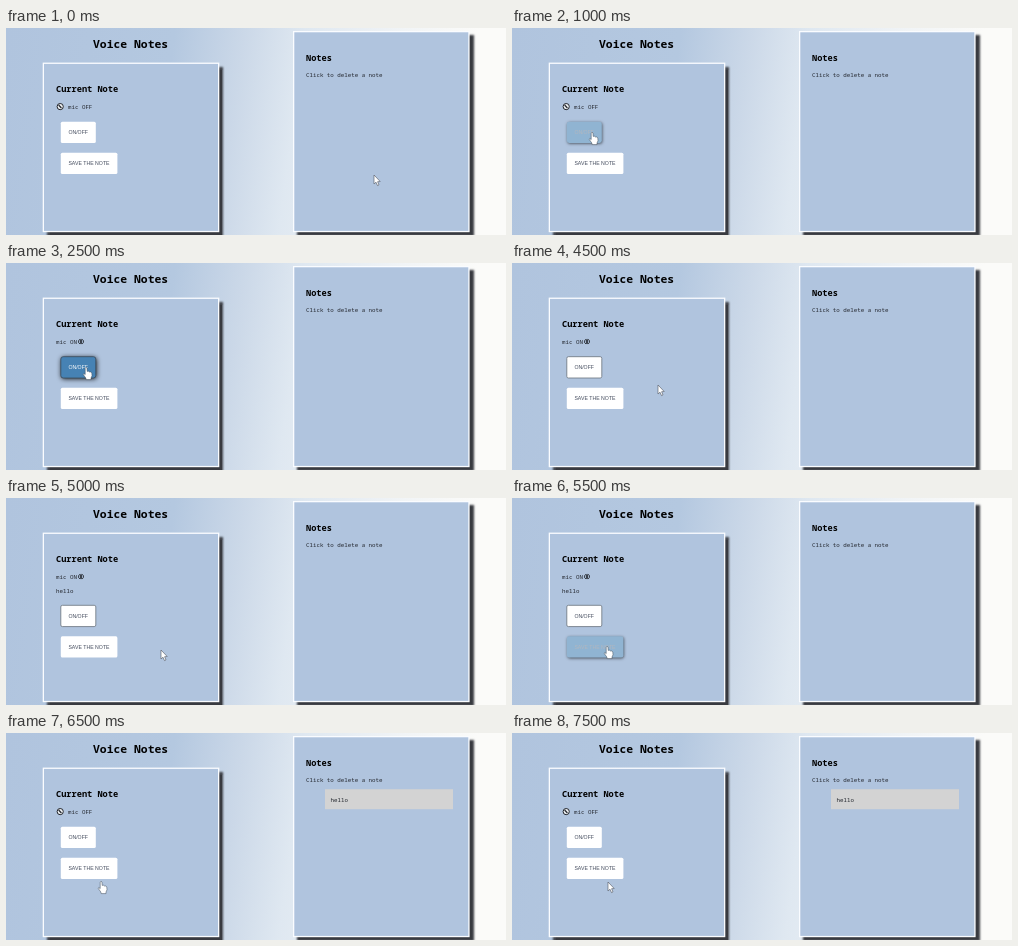
Animation of 500x207 px, one loop 8000 ms. Source, as an HTML page with a canvas:

```html
<!DOCTYPE html>
<html lang="en">
<head>
<meta charset="utf-8">
<title>Voice Notes</title>
<style>
  html, body { margin: 0; width: 100%; height: 100%; overflow: hidden; background: #b0c4de; }
  canvas { display: block; width: 500px; height: 207px; }
</style>
</head>
<body>
<canvas id="stage"></canvas>
<script>
const W = 500, H = 207, LOOP = 8000;
const canvas = document.getElementById('stage');
const ctx = canvas.getContext('2d');
const ratio = window.devicePixelRatio || 1;
canvas.width = Math.round(W * ratio);
canvas.height = Math.round(H * ratio);

const MONO = '"Noto Sans Mono", "DejaVu Sans Mono", monospace';
const SANS = '"Liberation Sans", Arial, sans-serif';
const PANEL = '#b0c4de';

// Each state holds until the next one starts; hover runs from 0 to 1.
const states = [
  { at: 0, arrow: [368, 147] },
  { at: 1000, hand: [77, 104], toggle: 0.6 },
  { at: 1500, hand: [77, 104], toggle: 1 },
  { at: 2000, hand: [77, 104], toggle: 1, on: true },
  { at: 4500, arrow: [146, 122], on: true },
  { at: 5000, arrow: [155, 152], on: true, draft: true },
  { at: 5500, hand: [92, 148], on: true, draft: true, save: 0.6 },
  { at: 6000, hand: [92, 148], on: true, draft: true, save: 1 },
  { at: 6500, hand: [92, 148], saved: true },
  { at: 7500, arrow: [96, 149], saved: true }
];

function text(str, x, y, size, weight = 400, color = '#000', family = MONO) {
  ctx.font = `${weight} ${size}px ${family}`;
  ctx.fillStyle = color;
  ctx.fillText(str, x, y);
}

function shadow(color, blur, dx = 0, dy = 0) {
  ctx.shadowColor = color;
  ctx.shadowBlur = blur * ratio;
  ctx.shadowOffsetX = dx * ratio;
  ctx.shadowOffsetY = dy * ratio;
}

function shape(points, fill, stroke, width) {
  ctx.beginPath();
  points.forEach(([x, y]) => ctx.lineTo(x, y));
  ctx.closePath();
  ctx.fillStyle = fill;
  ctx.fill();
  ctx.strokeStyle = stroke;
  ctx.lineWidth = width;
  ctx.lineJoin = 'round';
  ctx.stroke();
}

function backdrop() {
  const g = ctx.createLinearGradient(0, 0, 490, 62);
  g.addColorStop(0, '#b0c4de');
  g.addColorStop(0.34, '#b4c8e0');
  g.addColorStop(0.48, '#cbd8e8');
  g.addColorStop(0.6, '#dfe8f1');
  g.addColorStop(0.8, '#f1f4f6');
  g.addColorStop(0.95, '#fbfbf9');
  g.addColorStop(1, '#fbfbf9');
  ctx.fillStyle = g;
  ctx.fillRect(0, 0, W, H);
}

function panel(x, y, w, h) {
  ctx.save();
  shadow('#383a40', 2, 4, 4);
  ctx.fillStyle = '#fafcff';
  ctx.fillRect(x, y, w, h);
  ctx.restore();
  ctx.fillStyle = PANEL;
  ctx.fillRect(x + 1.3, y + 1.3, w - 2.6, h - 2.6);
}

function mix(a, b, k) {
  return `rgb(${a.map((v, i) => Math.round(v + (b[i] - v) * k))})`;
}

function button(label, y, w, hover = 0, focus = false) {
  const x = 54.8, h = 21.3;
  ctx.save();
  if (hover) shadow(`rgba(0,0,0,${0.95 * hover})`, 5 * hover, 0.6, 0.8);
  ctx.beginPath();
  ctx.roundRect(x, y, w, h, hover ? 2.4 : 1.6);
  ctx.fillStyle = mix([255, 255, 255], [70, 130, 180], hover);
  ctx.fill();
  ctx.restore();
  if (focus) {
    ctx.strokeStyle = hover ? '#3c4c5c' : '#69717c';
    ctx.lineWidth = 0.8;
    ctx.stroke();
  }
  text(label, 62.4, y + 12.2, 5.2, 400, mix([66, 74, 92], [255, 255, 255], hover), SANS);
}

function ring(x, y, r, width, from = 0, to = Math.PI * 2) {
  ctx.beginPath();
  ctx.arc(x, y, r, from, to);
  ctx.lineWidth = width;
  ctx.strokeStyle = '#20242b';
  ctx.stroke();
}

function micOff() {
  ctx.beginPath();
  ctx.arc(54.2, 78.6, 3.2, 0, Math.PI * 2);
  ctx.fillStyle = '#eef1f3';
  ctx.fill();
  ring(54.2, 78.6, 3.1, 1);
  ctx.beginPath();
  ctx.moveTo(52.6, 77);
  ctx.lineTo(55.4, 80);
  ctx.lineWidth = 1.2;
  ctx.stroke();
  text('mic OFF', 62, 81, 5.8, 400, '#23272e');
}

function micOn() {
  text('mic ON', 50, 81, 5.8, 400, '#23272e');
  ctx.fillStyle = '#20242b';
  ctx.fillRect(74.2, 76.3, 1.6, 4.6);
  ring(75, 78.6, 2.5, 0.9, -1.2, 1.2);
  ring(75, 78.6, 2.5, 0.9, 1.95, 4.33);
}

function arrow(x, y) {
  const outline = [[0, 0], [0, 9], [2, 7.2], [3.5, 10.6], [5, 9.9], [3.6, 6.7], [6.2, 6.5]];
  shape(outline.map(([a, b]) => [x + a, y + b]), '#fff', '#50555e', 0.6);
}

function hand(x, y) {
  const outline = [
    [2.2, 1], [3, 0.2], [4, 1], [4.2, 4.4], [5.5, 4.2], [6.5, 5], [7.7, 4.9],
    [8.8, 6], [9, 8.8], [8, 11], [8, 12.6], [3.2, 12.6], [2.8, 11], [0.3, 7.5],
    [0.7, 6.5], [2.2, 7.6]
  ];
  shape(outline.map(([a, b]) => [x + a, y + b]), '#fff', '#3d4855', 0.5);
}

function draw(t) {
  const s = states.findLast(state => t >= state.at);
  ctx.setTransform(ratio, 0, 0, ratio, 0, 0);
  backdrop();
  panel(36.7, 34.6, 176.6, 169.6);
  panel(287, 3, 176.6, 201.2);

  text('Voice Notes', 87, 20, 11.4, 600);
  text('Current Note', 50, 64.4, 8.65, 600);
  text('Notes', 300, 33, 8.65, 600);
  text('Click to delete a note', 300, 49, 5.8, 400, '#23272e');

  if (s.on) micOn(); else micOff();
  if (s.draft) text('hello', 50, 94.8, 5.8, 400, '#23272e');

  const drop = s.draft ? 13.6 : 0;
  button('ON/OFF', 93.7 + drop, 35, s.toggle, s.on);
  button('SAVE THE NOTE', 124.7 + drop, 56.6, s.save);

  if (s.saved) {
    ctx.fillStyle = '#d3d3d3';
    ctx.fillRect(319, 56.2, 128, 20);
    text('hello', 324.6, 68.6, 5.8, 400, '#23272e');
  }
  if (s.hand) hand(...s.hand); else arrow(...s.arrow);
}

const start = performance.now();
function tick(now) {
  draw(Math.max(0, now - start) % LOOP);
  requestAnimationFrame(tick);
}
draw(0);
requestAnimationFrame(tick);
</script>
</body>
</html>
```
